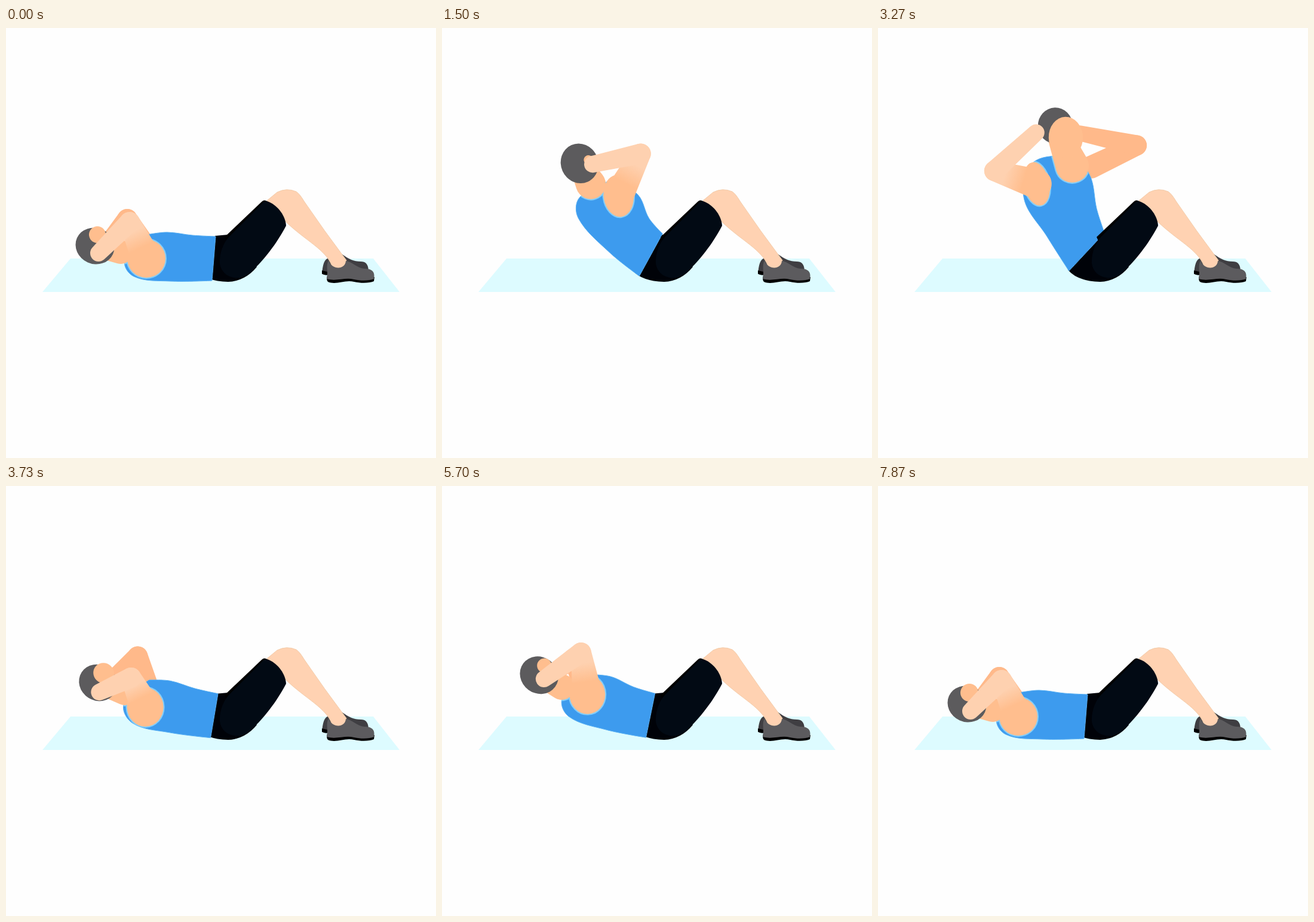
An HTML page for the animation above (8000 ms loop, 720 by 720 pixels).

```html
<!DOCTYPE html>
<html lang="en">
<head>
<meta charset="utf-8">
<title>Twisting sit-ups</title>
<style>
html, body { margin: 0; width: 100%; height: 100%; overflow: hidden; background: #fefefe; }
svg { display: block; width: 100vw; height: 100vh; }
</style>
</head>
<body>
<svg viewBox="0 0 720 720">
  <defs>
    <linearGradient id="skin" gradientUnits="userSpaceOnUse">
      <stop offset=".3" stop-color="#ffbe8e"/>
      <stop offset=".75" stop-color="#fed1b0"/>
    </linearGradient>
    <clipPath id="shirt"><path id="clip"/></clipPath>
  </defs>
  <rect width="720" height="720" fill="#fefefe"/>
  <path d="M108 386H615L659 442H61Z" fill="#ddfbff"/>

  <!-- shoes and lower leg -->
  <path d="M538 386C531 390 530 402 529 412L545 414L607 405C606 395 602 391 594 391C582 391 574 387 563 379Z" fill="#3f3e42"/>
  <path d="M529 406V411Q533 415 542 413V409Z"/>
  <path d="M437 289L454 275Q470 267 486 274Q492 278 499 290Q533 340 570 389L568 397Q557 407 546 399C536 371 501 356 468 324Z" fill="#ffd2b2" stroke="#f3cba8"/>
  <path d="M538 414Q536 422 539 425C553 431 567 421 583 425C596 428 609 427 616 424L617 417Z"/>
  <path d="M540 389C535 398 540 408 537 420C553 425 567 417 583 421C596 424 609 423 616 420C619 406 610 403 600 403C588 402 579 391 569 390C568 405 546 406 540 389Z" fill="#5c5b5e"/>

  <g fill="#ffb98a"><path id="farUpper"/><path id="farFore"/></g>
  <path d="M350 348L372 346L420 400Q400 424 372 425Q334 424 318 405Z" fill="#000208"/>
  <path id="torso" fill="#3d9bee" stroke="#5cb2f4"/>
  <g clip-path="url(#shirt)" fill="none" stroke="#83cdf8" stroke-width="4">
    <path id="collar"/>
    <ellipse id="armhole"/>
  </g>
  <path d="M366 350L428 291Q432 286 439 291L410 350L376 372Z"/>
  <path d="M373 350L431 292Q435 289 440 291C456 298 468 315 469 331C454 360 430 392 405 413C388 424 361 418 358 394C357 377 364 360 373 350Z" fill="#020a14"/>

  <path id="neck" fill="#ffbe8e"/>
  <ellipse id="hair" fill="#5c5b5d"/>
  <ellipse id="face" fill="#ffbe8e"/>
  <g fill="url(#skin)"><ellipse id="shoulder"/><path id="upper"/></g>
  <path id="fore" fill="#fed1b0"/>
</svg>
<script>
const HIP = [375, 390];
const TURN = 66 * Math.PI / 180;

// Key points on the stage: lying down, sitting up turned away, sitting up facing.
const joints = {
  head:        [[149, 365], [311, 187], [303, 161]],
  face:        [[153, 346], [325, 190], [320, 182]],
  neck:        [[192, 375], [311, 224], [330, 230]],
  shoulder:    [[235, 386], [361, 257], [268, 258]],
  elbow:       [[207, 325], [434, 208], [195, 235]],
  hand:        [[155, 377], [346, 197], [270, 172]],
  farShoulder: [[232, 365], [268, 250], [362, 232]],
  farElbow:    [[203, 320], [230, 238], [440, 198]],
  farHand:     [[165, 365], [277, 207], [345, 175]]
};
const outline = {
  waistFront:  [[351, 349], [380, 343], [380, 343]],
  belly:       [[312, 347], [372, 312], [368, 302]],
  chest:       [[270, 342], [378, 268], [360, 250]],
  collarFront: [[236, 346], [347, 221], [338, 214]],
  collarBack:  [[199, 388], [276, 237], [266, 220]],
  back:        [[214, 416], [261, 272], [246, 280]],
  lumbar:      [[275, 424], [290, 355], [284, 348]],
  waistBack:   [[345, 423], [319, 406], [319, 406]]
};
const corners = [0, 3, 7];

const $ = id => document.getElementById(id);
const draw = (id, d) => $(id).setAttribute("d", d);
const mix = (a, b, k) => a + (b - a) * k;

function rotate([x, y], angle) {
  const c = Math.cos(angle), s = Math.sin(angle), [hx, hy] = HIP;
  return [hx + (x - hx) * c - (y - hy) * s, hy + (x - hx) * s + (y - hy) * c];
}

// A point swings around the hip while it drifts within the leaning body.
function swing([lying, away, facing], side, s, drift = s) {
  const top = rotate(side === "away" ? away : facing, -TURN);
  return rotate(lying.map((v, i) => mix(v, top[i], drift)), TURN * s);
}

// Two circles joined by their outer tangents.
function limb([ax, ay], r, [bx, by], q) {
  const dist = Math.hypot(bx - ax, by - ay);
  const dir = Math.atan2(by - ay, bx - ax);
  const open = Math.acos(Math.max(-1, Math.min(1, (r - q) / (dist || 1))));
  const on = (x, y, rad, a) => `${x + rad * Math.cos(a)} ${y + rad * Math.sin(a)}`;
  const wide = open < Math.PI / 2 ? 1 : 0;
  return `M${on(ax, ay, r, dir + open)}A${r} ${r} 0 ${wide} 1 ${on(ax, ay, r, dir - open)}` +
    `L${on(bx, by, q, dir - open)}A${q} ${q} 0 ${1 - wide} 1 ${on(bx, by, q, dir + open)}Z`;
}

// Smooth closed outline with a few sharp corners.
function closed(pts) {
  const n = pts.length, at = i => pts[(i + n) % n];
  const handle = (i, len) => {
    if (corners.includes(i % n)) return [0, 0];
    const [ax, ay] = at(i - 1), [bx, by] = at(i + 1);
    const f = len * .34 / Math.hypot(bx - ax, by - ay);
    return [(bx - ax) * f, (by - ay) * f];
  };
  return "M" + pts[0] + pts.map(([x, y], i) => {
    const [X, Y] = at(i + 1), len = Math.hypot(X - x, Y - y);
    const [a, b] = handle(i, len), [c, d] = handle(i + 1, len);
    return "C" + [x + a, y + b, X - c, Y - d, X, Y];
  }).join("") + "Z";
}

function oval(id, [cx, cy], rx, ry, degrees) {
  const attrs = { cx, cy, rx, ry, transform: `rotate(${degrees} ${cx} ${cy})` };
  for (const k in attrs) $(id).setAttribute(k, attrs[k]);
}

// Every second holds one move: up away, down, up facing, down.
function lift(ms) {
  const move = Math.floor(ms / 1000) % 4;
  const u = Math.min(1, Math.max(0, (ms % 1000 - 200) / 670));
  const e = u * u * (3 - 2 * u);
  const up = move % 2 ? 1 - e : e;
  return { side: move < 2 ? "away" : "facing", s: up * (1.25 - .25 * up) };
}

function render(ms) {
  const { side, s } = lift(ms);
  const away = side === "away";
  const j = {};
  for (const name in joints) {
    // The far arm stays behind the body at first when turning away.
    const late = away && name.startsWith("far");
    j[name] = swing(joints[name], side, s, late ? s * s : s);
  }

  draw("farUpper", limb(j.farShoulder, 19, j.farElbow, 17));
  draw("farFore", limb(j.farElbow, 17, j.farHand, 13));

  const shirt = closed(Object.values(outline).map(p => swing(p, side, s)));
  draw("torso", shirt);
  draw("clip", shirt);

  const neck = limb(j.head, 18, j.neck, 20 + 8 * s);
  draw("neck", neck);
  draw("collar", neck);
  const lean = 66 * s;
  oval("hair", j.head, mix(30, away ? 32 : 29, s), mix(33, away ? 34 : 30, s), lean - 66);
  oval("face", j.face, away ? 14 - 10 * s : 15 + 14 * s, away ? 14 - 10 * s : 15 + 20 * s, lean - 66);

  for (const id of ["armhole", "shoulder"])
    oval(id, j.shoulder, 32 - 11 * s, 32 + 5 * s, -12 * s);
  draw("upper", limb(j.shoulder, 25, j.elbow, 17));
  draw("fore", limb(j.elbow, 17, j.hand, 14));
  ["x", "y"].forEach((axis, i) => {
    $("skin").setAttribute(axis + 1, j.shoulder[i]);
    $("skin").setAttribute(axis + 2, j.elbow[i]);
  });
}

function tick() {
  render(performance.now() % 8000);
  requestAnimationFrame(tick);
}
tick();
</script>
</body>
</html>
```
